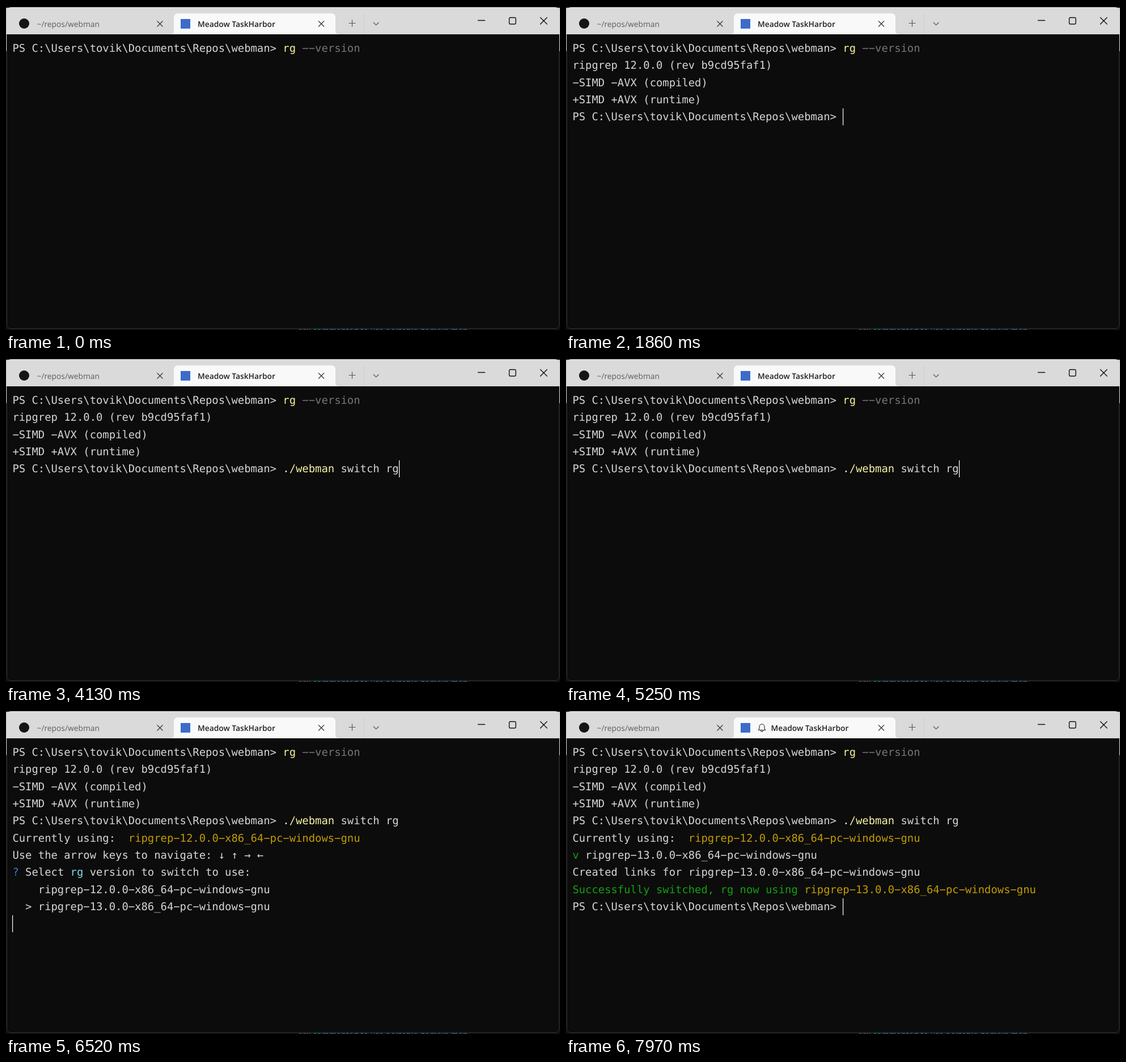
Write an HTML page that moves like this. It is 977 by 573 pixels and loops after 8 s.

```html
<!DOCTYPE html>
<html lang="en">
<head>
<meta charset="utf-8">
<title>Terminal</title>
<style>
html, body { margin: 0; width: 100%; height: 100%; overflow: hidden; background: #000; }
svg, pre { position: absolute; left: 0; top: 0; }
svg { display: block; }
svg text { font: 13.8px "Open Sans", "Noto Sans", sans-serif; text-rendering: geometricPrecision; }
svg .strong { font-weight: 600; }
pre {
  margin: 0; left: 11.4px; top: 59.9px; color: #d6d6d6;
  font: 18.87px/30.33px "DejaVu Sans Mono", monospace;
  font-variant-ligatures: none; text-rendering: geometricPrecision;
}
.cmd { color: #f9f1a5; }
.dim { color: #767676; }
.gold { color: #c19c00; }
.blue { color: #3b78d8; }
.cyan { color: #80d8e8; }
.green { color: #13a10e; }
</style>
</head>
<body>
<svg width="977" height="573" viewBox="0 0 977 573">
  <!-- what shows around the window -->
  <path d="M0 3H977V80H0Z" fill="#c4c4c4"/>
  <path d="M0 80H977V573H0Z" fill="#101010"/>
  <text class="strong" x="515" y="578.5" fill="#1f6f94"><tspan fill="#555">ask</tspan> commented to use portable domain map</text>

  <path d="M1.5 50V563Q1.5 570.5 9 570.5H968Q975.5 570.5 975.5 563V50Z" fill="#0c0c0c" stroke="#333"/>
  <path d="M1 50V10Q1 2 9 2H968Q976 2 976 10V50Z" fill="#dadada"/>
  <path d="M290 50Q296 50 296 44V21Q296 13 304 13H573Q581 13 581 21V44Q581 50 587 50Z" fill="#f9f9f9"/>
  <path d="M631.5 13V50" stroke="#cecece"/>

  <circle cx="32" cy="31" r="9" fill="#151515"/>
  <rect x="308" y="23" width="17" height="17" fill="#3c6cc8"/>
  <text x="54.5" y="37" fill="#5c5c5c">~/repos/webman</text>
  <text id="title" class="strong" x="338" y="37" fill="#202020">Meadow TaskHarbor</text>

  <g fill="none" stroke="#333" stroke-width="1.2">
    <path id="bell" d="M339.5 35.5L341 32.5V29.5A4.5 4.5 0 0 1 350 29.5V32.5L351.5 35.5ZM343.5 36A2 2 0 0 0 347.5 36"/>
    <path d="M266.5 26.5l10 10m0-10l-10 10M551 26.5l10 10m0-10l-10 10"/>
    <path d="M604.5 30.5h12m-6-6v12M648 29l4.7 4.7 4.7-4.7" stroke="#555"/>
    <path d="M832 25.5h13M942 20l12.5 12.5m0-12.5l-12.5 12.5" stroke="#111" stroke-width="1.4"/>
    <rect x="887.5" y="20.5" width="11.5" height="11.5" rx="2" stroke="#111" stroke-width="1.4"/>
  </g>
</svg>
<pre id="screen"></pre>
<svg width="977" height="573" viewBox="0 0 977 573">
  <rect id="caret" width="1.2" height="30" fill="#fff"/>
  <g id="mouse">
    <circle id="click" r="14" cy="-.5" fill="#808000"/>
    <path d="M.5 .5V15L3.6 12 6 17.5 8.2 16.5 5.9 11.2H10Z" fill="#fff"/>
  </g>
</svg>
<script>
const LOOP = 8000, CELL = 11.36, ROW = 30.33;
const $ = id => document.getElementById(id);
const tag = (cls, text) => `<span class="${cls}">${text}</span>`;
const show = (el, on) => el.setAttribute('visibility', on ? 'visible' : 'hidden');
const place = (el, x, y) => el.setAttribute('transform', `translate(${x} ${y})`);

const pkg = version => `ripgrep-${version}.0.0-x86_64-pc-windows-gnu`;
const prompt = 'PS C:\\Users\\tovik\\Documents\\Repos\\webman&gt; ';
const first = [prompt + tag('cmd', 'rg') + tag('dim', ' --version')];
const output = [...first, 'ripgrep 12.0.0 (rev b9cd95faf1)', '-SIMD -AVX (compiled)', '+SIMD +AVX (runtime)'];
const typed = text => [...output, prompt + text];
const switching = [...typed(tag('cmd', './webman') + ' switch rg'),
  'Currently using:  ' + tag('gold', pkg(12))];
const menu = chosen => [...switching,
  'Use the arrow keys to navigate: ↓ ↑ → ←',
  tag('blue', '?') + ' Select ' + tag('cyan', 'rg') + ' version to switch to use:',
  ...[12, 13].map(v => (v === chosen ? '  &gt; ' : '    ') + pkg(v))];
const done = [...switching,
  tag('green', 'v ') + pkg(13),
  'Created links for ' + pkg(13),
  tag('green', 'Successfully switched, rg now using ') + tag('gold', pkg(13)),
  prompt];

// [start, lines]
const screens = [
  [0, first], [1760, output], [1860, typed('')],
  [3400, typed(tag('cmd', 'rg') + tag('dim', ' --version'))],
  [3730, typed(tag('cmd', 'clear'))],
  [4130, switching.slice(0, 5)],
  [5450, menu(12)], [6520, menu(13)], [7970, done]
].map(([t, lines]) => [t, lines.join('\n').replaceAll('-', '−')]);

// [start, column, row]; no column means hidden
const carets = [
  [0], [70, 54, 0], [270], [930, 54, 0], [1460], [1660, 0, 1], [1760, 0, 4],
  [1860, 42, 4], [2330], [2850, 42, 4], [3400, 54, 4], [3730, 47, 4],
  [4130, 60, 4], [4720], [5250, 60, 4], [5450, 0, 10], [6050],
  [6520, 0, 10], [7180], [7710, 0, 10], [7970, 42, 9]
];
const at = (list, t) => list.findLast(item => item[0] <= t);

let shown;
function draw(t) {
  const text = at(screens, t)[1];
  if (text !== shown) $('screen').innerHTML = shown = text;

  const [, col, row] = at(carets, t);
  show($('caret'), col !== undefined);
  if (col !== undefined) place($('caret'), Math.floor(11.6 + col * CELL), Math.round(60 + row * ROW));

  const bell = t >= 6580;
  show($('bell'), bell);
  $('title').setAttribute('x', bell ? 361.5 : 338);

  // the pointer glides in over six steps, then clicks
  const step = Math.min(5, Math.floor((t - 460) / 66));
  const left = (1 - step / 5) ** 2;
  place($('mouse'), 870 - 45 * left, 488.5 + 59 * left);
  const pointer = t >= 460 && t < 1660;
  show($('mouse'), pointer);
  show($('click'), pointer && t >= 930 && t < 1060);
}

const start = performance.now();
function tick() {
  draw((performance.now() - start) % LOOP);
  requestAnimationFrame(tick);
}
tick();
</script>
</body>
</html>
```
